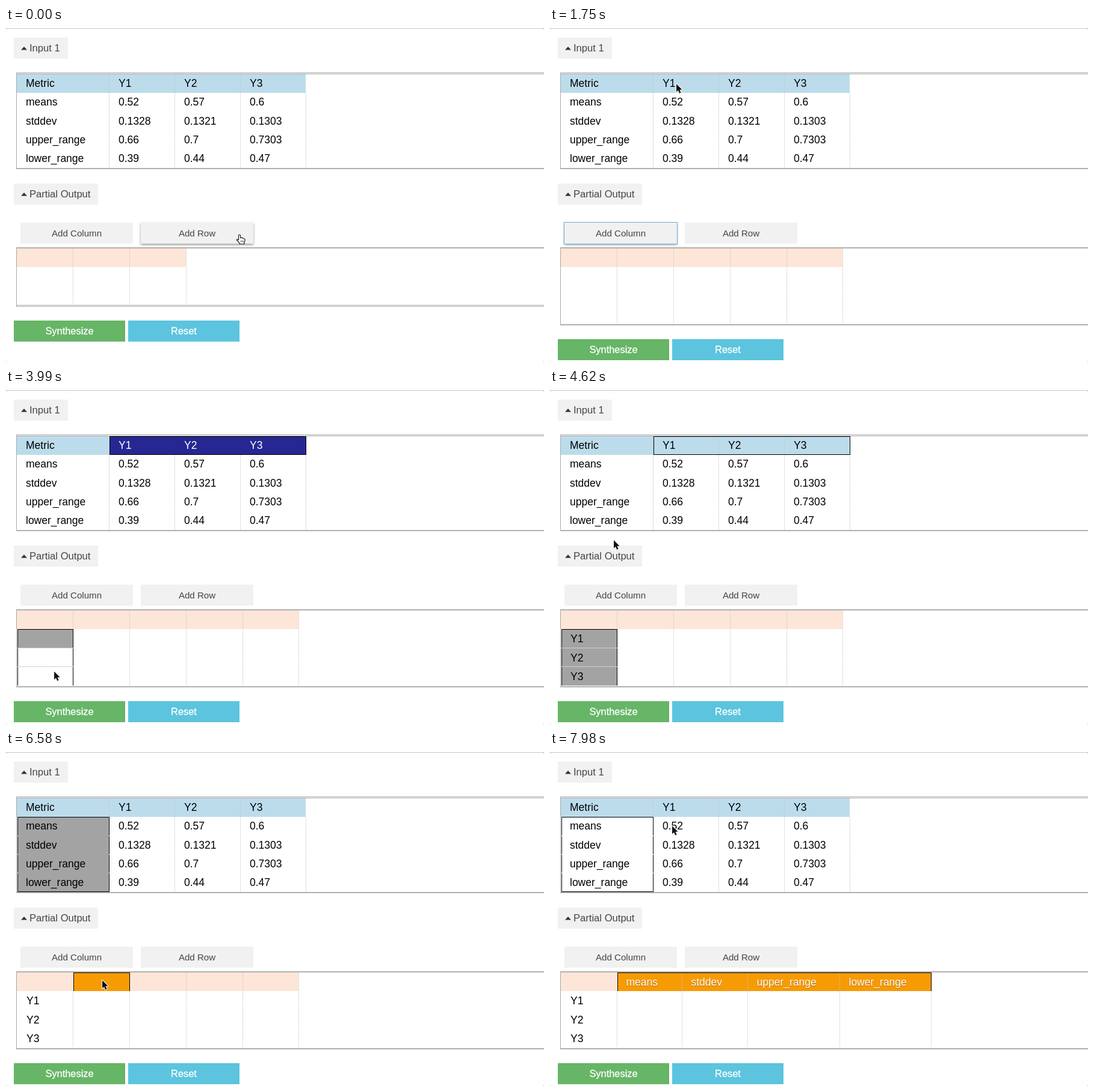
Write an HTML page with a canvas that moves like this. It is 894 px wide and 556 px high and loops after 8 s.

```html
<!DOCTYPE html>
<html lang="en">
<head>
<meta charset="utf-8">
<title>Table synthesis demo</title>
<style>
html, body { margin: 0; width: 100%; height: 100%; overflow: hidden; background: #fff; }
canvas { display: block; }
</style>
</head>
<body>
<canvas id="stage" width="894" height="556"></canvas>
<script>
const ctx = document.getElementById('stage').getContext('2d');
const LOOP = 8000, STEP = 70;
const FONT = '"Liberation Sans", Arial, sans-serif';
const BLUE = '#bcdceb', NAVY = '#272794', GRAY = '#a3a3a3', PEACH = '#fde6d7', ORANGE = '#f79b04';

const inputRows = [
  ['Metric', 'Y1', 'Y2', 'Y3'],
  ['means', '0.52', '0.57', '0.6'],
  ['stddev', '0.1328', '0.1321', '0.1303'],
  ['upper_range', '0.66', '0.7', '0.7303'],
  ['lower_range', '0.39', '0.44', '0.47']
];
const inputCols = [18, 171, 280, 389, 498];
const inputLines = [77, 108, 139, 170, 201, 233];
const outputLines = [367, 398, 430, 461, 492];

// Moments of the interaction, in ms
const addRowAt = 350, addColAt = [980, 1260];
const headerDrag = { down: 1890, up: 2590 };
const namesDrag = { down: 3430, up: 4200 };
const metricDrag = { down: 5180, up: 5950 };
const titleDrag = { down: 6580, up: 7560 };

// Cursor tip: time, x, y
const cursorPath = [
  [0, 388, 344], [420, 388, 344], [840, 168, 344], [1300, 168, 344],
  [1750, 210, 93], [1960, 210, 93], [2450, 432, 94], [2730, 432, 94],
  [3360, 81, 408], [3570, 81, 408], [4060, 80, 472], [4270, 80, 472],
  [4620, 106, 250], [5000, 82, 120], [5270, 82, 120], [5740, 81, 219],
  [6020, 81, 219], [6510, 160, 380], [6650, 160, 380], [7300, 448, 378],
  [7600, 448, 378], [7980, 203, 123]
];

const arrow = new Path2D('M0 0V13.5L3 10.7L5.2 15.7L7.6 14.6L5.4 9.8H9.6Z');
const hand = new Path2D('M-1.5 1Q0-1 1.5 1V5.5Q4 4 5 6Q7 5.3 7.4 7Q9.4 6.8 9.2 9L8 13V15.5H0V14L-4.8 8.8Q-4.3 6.7-1.5 9Z');

// Interpolates the values that follow each key's time
function track(keys, t, ease = u => u) {
  const i = keys.findIndex(k => k[0] > t);
  if (i === 0) return keys[0].slice(1);
  if (i < 0) return keys[keys.length - 1].slice(1);
  const a = keys[i - 1], b = keys[i], u = ease((t - a[0]) / (b[0] - a[0]));
  return a.slice(1).map((v, n) => v + (b[n + 1] - v) * u);
}
const cursorAt = t => track(cursorPath, t, u => u * u * (3 - 2 * u));

function rect(x, y, w, h, color, alpha = 1) {
  ctx.globalAlpha = alpha;
  ctx.fillStyle = color;
  ctx.fillRect(x, y, w, h);
  ctx.globalAlpha = 1;
}

function text(str, x, y, size, color = '#000', align = 'left') {
  ctx.font = `${size}px ${FONT}`;
  ctx.fillStyle = color;
  ctx.textAlign = align;
  ctx.fillText(str, x, y);
}

function dotted(x, y1, y2) {
  ctx.strokeStyle = '#c4c4c4';
  ctx.lineWidth = 1;
  ctx.setLineDash([1, 1]);
  ctx.beginPath();
  ctx.moveTo(x + .5, y1);
  ctx.lineTo(x + .5, y2);
  ctx.stroke();
  ctx.setLineDash([]);
}

// Number of cells spanned by a drag along one axis
function span(drag, t, edges, first, axis) {
  const pos = cursorAt(Math.min(t, drag.up))[axis];
  return 1 + edges.slice(first + 1, -1).filter(e => pos >= e).length;
}

function outline(x1, y1, x2, y2, bottom = true) {
  rect(x1, y1, x2 - x1, 1, '#000');
  rect(x1, y1, 1, y2 - y1, '#000');
  rect(x2 - 1, y1, 1, y2 - y1, '#000');
  if (bottom) rect(x1, y2 - 1, x2 - x1, 1, '#000');
}

function collapser(label, y, width) {
  rect(13, y, width, 35, '#f1f1f1');
  ctx.fillStyle = '#333';
  ctx.beginPath();
  ctx.moveTo(25, y + 20.5);
  ctx.lineTo(30, y + 15);
  ctx.lineTo(35, y + 20.5);
  ctx.fill();
  text(label, 39, y + 23, 16.6, '#444');
}

function addButton(label, x, hover, focus) {
  ctx.save();
  if (hover || focus) {
    ctx.shadowColor = 'rgba(0,0,0,.4)';
    ctx.shadowBlur = 4;
    ctx.shadowOffsetY = 2;
  }
  rect(x, 324, 187, 35, '#f1f1f1');
  ctx.restore();
  if (focus) {
    ctx.strokeStyle = '#70aed6';
    ctx.lineWidth = 1;
    ctx.strokeRect(x - .5, 323.5, 188, 36);
  }
  text(label, x + 93.5, 347, 15.1, '#444', 'center');
}

function action(label, x, y, color) {
  rect(x, y, 185, 35, color);
  ctx.lineWidth = .3;
  ctx.strokeStyle = '#fff';
  text(label, x + 92.5, y + 23, 16.4, '#fff', 'center');
  ctx.strokeText(label, x + 92.5, y + 23);
}

function drawInput(t) {
  rect(18, 77, 480, 31, BLUE);

  const inHeader = t >= headerDrag.down && t < metricDrag.down;
  const [navy] = track([[namesDrag.up, 1], [namesDrag.up + 280, 0]], t);
  const headerCount = inHeader ? span(headerDrag, t, inputCols, 1, 0) : 0;
  const navyCount = t < headerDrag.up ? Math.min(1, headerCount) : headerCount;
  if (navyCount) rect(172, 77, inputCols[1 + navyCount] - 171, 31, NAVY, navy);

  const inMetrics = t >= metricDrag.down;
  const metricCount = inMetrics ? span(metricDrag, t, inputLines, 1, 1) : 0;
  const grayCount = t < metricDrag.up ? Math.min(1, metricCount) : metricCount;
  const [gray] = track([[6650, 1], [7000, .4], [7300, .14], [7490, .14], [7560, 0]], t);
  for (let r = 0; r < grayCount; r++) {
    if (t >= 7300 && r % 2) continue;
    rect(19, inputLines[r + 1], 152, inputLines[r + 2] - inputLines[r + 1], GRAY, gray);
  }

  inputCols.slice(1).forEach(x => dotted(x, 108, 233));
  inputCols.slice(1, 4).forEach((x, i) => { if (i >= navyCount || navy < .5) dotted(x, 77, 108); });
  if (headerCount) outline(172, 77, inputCols[1 + headerCount] + 1, 108);
  if (metricCount) {
    const bottom = inputLines[1 + metricCount];
    outline(19, 108, 172, bottom);
    for (let r = 1; r < metricCount; r++) {
      rect(19, inputLines[r + 1], 1, 1, '#fff');
      rect(171, inputLines[r + 1], 1, 1, '#fff');
    }
  }

  inputRows.forEach((row, r) => row.forEach((value, c) => {
    const white = r === 0 && c > 0 && c <= navyCount && navy > .5;
    text(value, c ? 78 + c * 109 : 33, [98, 129, 161, 192, 223][r], 17.5, white ? '#fff' : '#000');
  }));

  rect(17, 74, 877, 1, '#a8a8a8');
  rect(17, 76, 877, 1, '#a8a8a8');
  rect(17, 74, 1, 161, '#a8a8a8');
  rect(17, 233, 877, 2, '#b0b0b0');
}

function drawOutput(t) {
  const filled = t >= titleDrag.up;
  const rowCount = t < addRowAt ? 3 : 4;
  const colCount = 3 + addColAt.filter(at => t >= at).length;
  const cols = filled ? [18, 111, 219, 328, 481, 633] : [18, 111, 205, 299, 393, 486].slice(0, colCount + 1);
  const bottom = outputLines[rowCount];
  rect(18, 367, cols[colCount] - 18, 31, PEACH);

  const inNames = t >= namesDrag.down && t < titleDrag.down;
  const nameCount = inNames ? span(namesDrag, t, outputLines, 1, 1) : 0;
  const [gray] = track([[metricDrag.down, 1], [5880, .315], [6160, 0]], t);
  const grayCount = t < namesDrag.up ? Math.min(1, nameCount) : nameCount;
  if (grayCount) rect(19, 398, 93, outputLines[1 + grayCount] - 398, GRAY, gray);

  const inTitles = t >= titleDrag.down;
  const titleCount = inTitles ? (filled ? 4 : span(titleDrag, t, cols, 1, 0)) : 0;
  if (inTitles) rect(112, 367, cols[filled ? 5 : 2] - 111, 31, ORANGE);

  cols.slice(1).forEach(x => dotted(x, inTitles && x < 206 || filled ? 398 : 367, bottom));
  if (filled) cols.slice(2, 5).forEach(x => dotted(x, 367, 398));
  if (nameCount) {
    outline(19, 398, 112, outputLines[1 + nameCount], false);
    for (let r = 1; r < nameCount; r++) rect(19, outputLines[r + 1] - 1, 93, 1, '#cfcfcf');
  }
  if (titleCount) outline(112, 367, cols[1 + titleCount] + 1, 398, false);

  if (t >= namesDrag.up) ['Y1', 'Y2', 'Y3'].forEach((name, r) => text(name, 34, [420, 452, 483][r], 17.5));
  if (filled) {
    ctx.save();
    ctx.shadowColor = 'rgba(80,40,0,.45)';
    ctx.shadowBlur = 1;
    ctx.shadowOffsetY = 1;
    inputRows.slice(1).forEach((row, i) => text(row[0], cols[i + 1] + 15.5, 389, 17.5, '#fff'));
    ctx.restore();
  }

  rect(17, 365, 877, 2, '#b0b0b0');
  rect(17, 365, 1, bottom - 363, '#a8a8a8');
  if (rowCount === 3) {
    rect(17, 461, 877, 1, '#a8a8a8');
    rect(17, 463, 877, 1, '#a8a8a8');
  } else {
    rect(17, 493, 877, 2, '#b0b0b0');
  }

  const y = rowCount === 3 ? 487 : 518;
  action('Synthesize', 13, y, '#67b566');
  action('Reset', 203, y, '#5cc4de');
}

function drawCursor(x, y, overButton) {
  ctx.save();
  ctx.translate(x, y);
  ctx.lineJoin = 'round';
  if (overButton) {
    ctx.fillStyle = '#fff';
    ctx.strokeStyle = '#222';
    ctx.lineWidth = 1.2;
    ctx.fill(hand);
    ctx.stroke(hand);
    [2.5, 4.5, 6.5].forEach(px => rect(px - .5, 9.5, .8, 3.5, '#444'));
  } else {
    ctx.strokeStyle = '#fff';
    ctx.lineWidth = 2;
    ctx.stroke(arrow);
    ctx.fillStyle = '#111';
    ctx.fill(arrow);
  }
  ctx.restore();
}

function draw(t) {
  rect(0, 0, 894, 556, '#c6c6c6');
  ctx.fillStyle = '#fff';
  ctx.beginPath();
  ctx.roundRect(0, 1, 894, 555, 3);
  ctx.fill();

  const [x, y] = cursorAt(t);
  const over = (left, top, width) => x >= left && x < left + width && y >= top && y < top + 35;
  const overCol = over(24, 324, 187), overRow = over(224, 324, 187);

  collapser('Input 1', 16, 90);
  collapser('Partial Output', 259, 140);
  addButton('Add Column', 24, overCol, t >= addColAt[0] && t < headerDrag.down);
  addButton('Add Row', 224, overRow, t >= addRowAt && t < addColAt[0]);
  drawInput(t);
  drawOutput(t);
  drawCursor(x, y, overCol || overRow || over(13, 259, 140));
}

const start = performance.now();
function frame() {
  const t = (performance.now() - start) % LOOP;
  draw(Math.floor(t / STEP) * STEP);
  requestAnimationFrame(frame);
}
frame();
</script>
</body>
</html>
```
